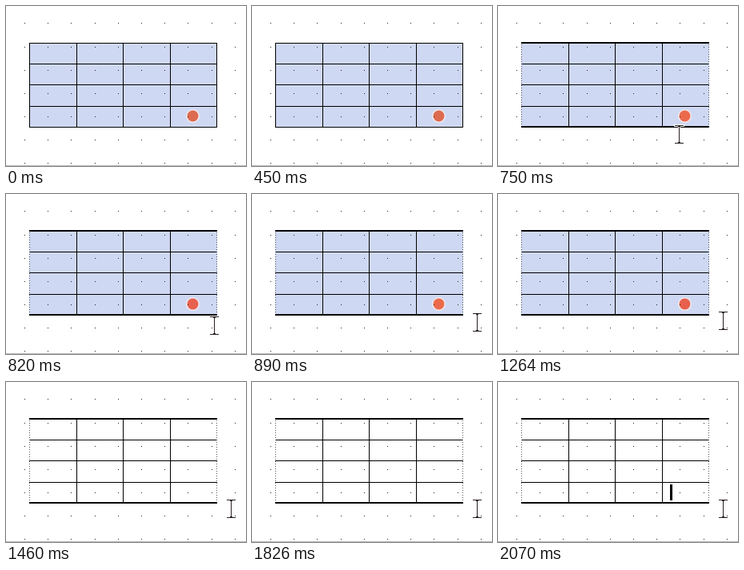
These frames come from a looping animation (300 by 200 pixels, 2130 ms). An HTML page with a canvas:

```html
<!DOCTYPE html>
<html lang="en">
<head>
<meta charset="utf-8">
<title>Table selection</title>
<style>
  html, body { margin: 0; width: 100%; height: 100%; overflow: hidden; background: #fff; }
  canvas { display: block; width: 300px; height: 200px; }
</style>
</head>
<body>
<canvas id="stage" width="300" height="200"></canvas>
<script>
const ctx = document.getElementById('stage').getContext('2d');
const LOOP = 2130;
const COLS = [29, 88, 146, 205, 263];
const ROWS = [46, 72, 98, 125, 151];

// start time, selected, marker colour, I-beam position, text caret
const STEPS = [
  { at: 0, selected: true, marker: '#dd6b50', framed: true },
  { at: 750, selected: true, marker: '#ec6a4c', beam: [226, 149] },
  { at: 820, selected: true, marker: '#e8604e', beam: [260, 153] },
  { at: 890, selected: true, marker: '#ec6a4c', beam: [281, 149] },
  { at: 970, selected: true, marker: '#e8604e', beam: [281, 147] },
  { at: 1460, beam: [281, 147] },
  { at: 2070, beam: [281, 147], caret: true }
];

function box(x, y, w, h, color) {
  ctx.fillStyle = color;
  ctx.fillRect(x, y, w, h);
}

function disc(x, y, r, color) {
  ctx.fillStyle = color;
  ctx.beginPath();
  ctx.arc(x, y, r, 0, Math.PI * 2);
  ctx.fill();
}

function drawGridDots() {
  for (let row = 0; row < 7; row++) {
    for (let col = 0; col < 10; col++) {
      box(Math.round(23 + col * 29.2), Math.round(21.4 + row * 29.15), 1, 1, '#222');
    }
  }
}

function drawTable(framed) {
  for (const y of ROWS.slice(1, 4)) box(29, y, 235, 1, '#000');
  for (const x of COLS.slice(1, 4)) box(x, 46, 1, 106, '#000');
  if (framed) {
    for (const y of [46, 151]) box(29, y, 235, 1, '#000');
    for (const x of [29, 263]) box(x, 46, 1, 106, '#000');
    return;
  }
  for (const y of [45, 150]) box(29, y, 235, 2, '#000');
  for (const x of [29, 263]) {
    for (let y = 48; y < 150; y += 3) box(x, y, 1, 1, '#555');
  }
}

function drawBeam([x, y]) {
  const parts = [[x - 5, y, 5, 1], [x + 1, y, 5, 1], [x, y + 1, 1, 21],
                 [x - 5, y + 22, 5, 1], [x + 1, y + 22, 5, 1]];
  for (const [px, py, w, h] of parts) box(px - 1, py - 1, w + 2, h + 2, '#fff');
  for (const part of parts) box(...part, '#2b2022');
  box(x - 1, y, 3, 2, '#2b2022');
  box(x - 1, y + 21, 3, 2, '#2b2022');
}

function draw(step) {
  box(0, 0, 300, 200, '#fff');
  box(0, 199, 300, 1, '#b8b8b8');
  if (step.selected) box(29, 46, 235, 105, '#ced8f3');
  if (step.marker) {
    disc(233.5, 137.5, 8.6, '#f0e7ea');
    disc(233.5, 137.5, 6.9, step.marker);
  }
  drawGridDots();
  drawTable(step.framed);
  if (step.caret) box(215, 128, 3, 20, '#000');
  if (step.beam) drawBeam(step.beam);
}

let shown;
const start = performance.now();
function tick(now) {
  const t = Math.max(0, now - start) % LOOP;
  const step = STEPS.findLast(s => s.at <= t);
  if (step !== shown) draw(shown = step);
  requestAnimationFrame(tick);
}
draw(shown = STEPS[0]);
requestAnimationFrame(tick);
</script>
</body>
</html>
```
